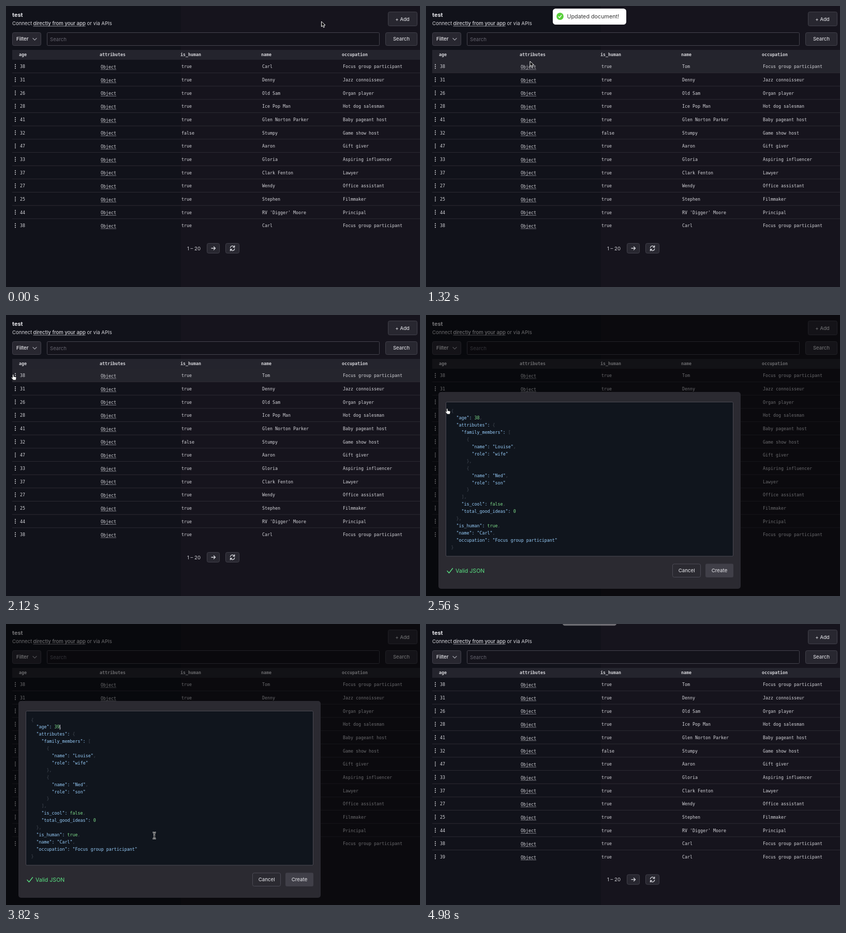
An HTML page for the animation above (5000 ms loop, 800x544 px).

```html
<!DOCTYPE html>
<html lang="en">
<head>
<meta charset="utf-8">
<title>Document table</title>
<style>
  html, body { margin: 0; width: 100%; height: 100%; overflow: hidden; background: #12121a; }
  svg { display: block; width: 800px; height: 544px; }
  text { font: 9.6px Inter, sans-serif; fill: #d3d3d8; }
  .mono { font: 8.32px "DejaVu Sans Mono", monospace; }
  .head { font-weight: 700; }
  .title { font-size: 10.97px; font-weight: 700; fill: #e6e6ea; }
  .mid { font-weight: 500; }
  .bold { font-weight: 600; }
  .json { fill: #97cdfa; }
  .btn { fill: #282730; stroke: #41404a; }
  .line { fill: none; stroke: #d8d8de; stroke-width: 1.3; stroke-linecap: round; stroke-linejoin: round; }
</style>
</head>
<body>
<svg id="stage" viewBox="0 0 800 544" xmlns="http://www.w3.org/2000/svg"></svg>
<script>
const LOOP = 5000, ROW_TOP = 103.8, PITCH = 25.67;
const COLS = [25, 181, 337, 493, 649];
const people = [
  [38, 'Carl', 'Focus group participant'], [31, 'Denny', 'Jazz connoisseur'],
  [26, 'Old Sam', 'Organ player'], [28, 'Ice Pop Man', 'Hot dog salesman'],
  [41, 'Glen Norton Parker', 'Baby pageant host'], [32, 'Stumpy', 'Game show host'],
  [47, 'Aaron', 'Gift giver'], [33, 'Gloria', 'Aspiring influencer'],
  [37, 'Clark Fenton', 'Lawyer'], [27, 'Wendy', 'Office assistant'],
  [25, 'Stephen', 'Filmmaker'], [44, "RV 'Digger' Moore", 'Principal'],
  [38, 'Carl', 'Focus group participant'], [39, 'Carl', 'Focus group participant']
];
const doc = {
  age: 38,
  attributes: {
    family_members: [{ name: 'Louise', role: 'wife' }, { name: 'Ned', role: 'son' }],
    is_cool: false,
    total_good_ideas: 0
  },
  is_human: true,
  name: 'Carl',
  occupation: 'Focus group participant'
};

const text = (x, y, s, cls = '', more = '') => `<text x="${x}" y="${y}" class="${cls}" ${more}>${s}</text>`;
const box = (x, y, w, h, r, more) => `<rect x="${x}" y="${y}" width="${w}" height="${h}" rx="${r}" ${more}/>`;
const button = (x, y, w, h) => box(x, y, w, h, 3, 'class="btn"');
const paint = line => line.replace(/"[^"]*"|\b(\d+|true|false)\b|[{}[\],]/g, (m, value) =>
  m[0] === '"' ? m : `<tspan fill="${value ? '#80e08c' : '#414852'}">${m}</tspan>`);

function row([age, name, job], i) {
  const y = 120.2 + i * PITCH, top = ROW_TOP + i * PITCH;
  const dots = [-6.7, -3.2, 0.3].map(d => `<circle cx="18" cy="${y + d}" r="1" fill="#dedee3"/>`).join('');
  const cells = [age, '', i === 5 ? 'false' : 'true', name, job]
    .map((s, c) => text(COLS[c] + 2, y, s, 'mono', c === 3 ? `id="name${i}"` : '')).join('');
  const rule = i ? `<path d="M12 ${top}H800" stroke="#2c2b33"/>` : '';
  return `<g id="row${i}">${box(12, top, 788, PITCH, 0, `id="hover${i}" fill="#25252d"`)}${rule}${dots}${cells}
    ${text(183, y + 0.8, 'Object', 'mono')}
    <path d="M183 ${y + 2.8}h30" stroke="#9a9aa2" stroke-width=".8"/></g>`;
}

const page = `
  <rect width="800" height="544" fill="#16141d"/><rect width="338" height="544" fill="#11121a"/>
  ${text(12, 20.5, 'test', 'title')}
  ${text(12, 37, 'Connect')}${text(52.5, 37, 'directly from your app', 'mid')}${text(156.5, 37, 'or via APIs')}
  <path d="M52.5 39h101" stroke="#b5b5bc" stroke-width=".8"/>
  ${button(738.5, 11.5, 56, 27)}${text(766, 28.5, '+ Add', 'mid', 'text-anchor="middle"')}
  ${button(12.5, 51.5, 55, 25)}${text(20, 67.4, 'Filter', 'bold')}
  <path class="line" d="M52 62.5l3.5 3.5 3.5-3.5" style="stroke:#9a9aa3"/>
  ${box(79.5, 51.5, 642, 25, 2, 'fill="#14131b" stroke="#45444e"')}
  ${text(85, 67.8, 'Search', '', 'style="fill:#65646f"')}
  ${button(733.5, 51.5, 61, 25)}${text(764, 67.4, 'Search', 'mid', 'text-anchor="middle"')}
  ${box(12, 85, 788, 19, 0, 'fill="#24242d"')}
  ${['age', 'attributes', 'is_human', 'name', 'occupation'].map((s, i) => text(COLS[i], 97.2, s, 'mono head')).join('')}
  ${people.map(row).join('')}
  <g id="pager">
    ${text(350, 472.5, '1 – 20')}
    ${button(388.5, 459.5, 24, 19)}<path class="line" d="M397 469h7.5m-3-3l3 3-3 3"/>
    ${button(424.5, 459.5, 26, 19)}
    <path class="line" d="M433.5 468a4 4 0 0 1 7-2.3l1.2 1.3m0-3v3h-3M441.7 470a4 4 0 0 1-7 2.3l-1.2-1.3m0 3v-3h3"/>
  </g>`;

const code = JSON.stringify(doc, null, 2).split('\n').map((line, i) => {
  const body = line.trimStart(), x = 48.5 + (line.length - body.length) * 5.01;
  return text(x, 188.6 + i * 13.89, paint(body), 'mono json', `id="code${i}"`);
}).join('');

const modal = `<g id="modal">
  <rect width="800" height="544" opacity=".5"/>
  ${box(24, 149, 584, 381, 5, 'fill="#2b2a31"')}
  ${box(38.5, 168.5, 555, 298.5, 2, 'fill="#10151d" stroke="#4b4a53"')}
  ${code}
  <path id="caret" d="M104.3 195v9.5" stroke="#e8e8ee"/>
  <path class="line" d="M41 495.5l3.5 4 7-9" style="stroke:#5be584"/>
  ${text(57, 498.8, 'Valid JSON', '', 'style="font-size:10.6px;fill:#5be584"')}
  ${box(476.5, 482, 54, 25.5, 3, 'fill="#2b2a31" stroke="#4c4b55"')}
  ${text(503.7, 498.4, 'Cancel', 'mid', 'text-anchor="middle"')}
  ${box(540, 481.5, 54, 26.5, 3, 'fill="#403f48"')}
  ${text(567, 498.4, 'Create', 'mid', 'text-anchor="middle"')}
</g>`;

const toast = (id, x, w, label) => `<g id="${id}">
  ${box(x, 5, w, 31, 5.5, 'fill="#fff"')}
  <g id="${id}Icon"><circle r="6.9" fill="#58cf3a"/>
  <path class="line" d="M-2.8 .4l2 2.1 3.4-4.6" style="stroke:#fff;stroke-width:1.4"/></g>
  ${text(x + 27.5, 24.2, label, '', 'style="font-size:10.75px;fill:#363636"')}</g>`;

const pointers = `<g id="pointer" stroke-linejoin="round">
  <path id="arrow" d="M0 0v10l2.4-2.2 1.6 3.8 1.9-.8-1.6-3.7h3.2z" fill="#000" stroke="#fff" stroke-width="1"/>
  <path id="hand" d="M-1.3 1.2c0-1.6 2.2-1.6 2.2 0v3l4 .8c1 .3 1.2 1 1 2l-.8 4h-5l-3.4-4c-.8-1.2.5-2 1.3-1.2l.7.7z" fill="#fff" stroke="#111" stroke-width=".7"/>
  <g id="beam" fill="none"><path d="M-3-6Q0-6 0-4Q0-6 3-6M0-4.5v9M-3 6Q0 6 0 4Q0 6 3 6M-1.5 1.5h3" stroke="#fff" stroke-width="2.6"/>
  <path d="M-3-6Q0-6 0-4Q0-6 3-6M0-4.5v9M-3 6Q0 6 0 4Q0 6 3 6M-1.5 1.5h3" stroke="#000" stroke-width="1"/></g>
</g>`;

const $ = id => document.getElementById(id);
$('stage').innerHTML = page + modal + toast('updated', 245, 142, 'Updated document!')
  + toast('created', 247, 138, 'Created document!') + pointers;

const show = (id, on) => $(id).setAttribute('visibility', on ? 'visible' : 'hidden');
const clamp = v => Math.max(0, Math.min(1, v));
const mix = (a, b, p) => a + (b - a) * p;

// time, x, y, pointer shape
const path = [
  [40, 609.5, 30, 'arrow'], [320, 505, 115, 'arrow'], [1060, 505, 115, 'arrow'],
  [1320, 201, 107, 'arrow'], [1540, 205, 281, 'arrow'], [1660, 205, 281, 'arrow'],
  [1780, 190, 404, 'arrow'], [2100, 14, 115, 'hand'], [2440, 14, 115, 'hand'],
  [2740, 90, 300, 'beam'], [3040, 128.5, 248, 'beam'], [3180, 106, 201, 'beam'],
  [3560, 106, 201, 'beam'], [3820, 286.5, 409.5, 'beam'], [4000, 560, 494, 'hand'],
  [4090, 560, 494, 'hand'], [4360, 455, 435, 'beam'], [4780, 470, 505, 'beam']
];

function pointerAt(t) {
  const i = path.findIndex(k => k[0] >= t);
  const b = path[i < 0 ? path.length - 1 : i], a = path[i - 1] || b;
  const p = b === a ? 1 : clamp((t - a[0]) / (b[0] - a[0])), e = p * p * (3 - 2 * p);
  return { x: mix(a[1], b[1], e), y: mix(a[2], b[2], e), shape: p < 0.5 ? a[3] : b[3] };
}

function drawToast(id, t, start, iconX) {
  const enter = clamp((t - start) / 45), leave = clamp((t - start - 850) / 50);
  const rise = 1 - (1 - enter) ** 3;
  const scale = mix(0.6, 1, rise) - 0.4 * leave;
  const y = 20.5 - 62 * (1 - rise) - 46.5 * leave;
  const el = $(id);
  el.setAttribute('display', enter > 0 && leave < 1 ? 'inline' : 'none');
  el.setAttribute('opacity', mix(0.5, 1, rise) * (1 - leave));
  el.setAttribute('transform', `translate(316 ${y}) scale(${scale}) translate(-316 -20.5)`);
  $(id + 'Icon').setAttribute('transform', `translate(${iconX} 20) scale(${clamp((t - start - 15) / 50)})`);
}

function editedName(t) {
  if (t < 560) return 'Carl';
  return 'Tom'.slice(0, clamp((t - 590) / 150) * 3);
}

function draw(t) {
  const open = t >= 2460 && t < 4090, added = t >= 4090;
  const p = pointerAt(t), here = t < 4780;
  const hover = here && !open ? Math.floor((p.y - ROW_TOP) / PITCH) : -1;
  people.forEach((_, i) => show('hover' + i, i === hover && (i < 13 || added)));
  $('row13').setAttribute('display', added ? 'inline' : 'none');
  $('pager').setAttribute('transform', `translate(0 ${added ? PITCH : 0})`);
  $('name0').textContent = editedName(t);

  $('modal').setAttribute('display', open ? 'inline' : 'none');
  $('modal').setAttribute('opacity', clamp((t - 2450) / 50));
  const age = t < 3260 ? '38' : t < 3420 ? '3' : '39';
  $('code1').innerHTML = paint(`"age": ${age},`);
  $('caret').setAttribute('opacity', t >= 3190 ? 1 : 0);
  $('caret').setAttribute('transform', `translate(${(age.length - 2) * 5.01} 0)`);

  drawToast('updated', t, 810, 259);
  drawToast('created', t, 4100, 261);

  $('pointer').setAttribute('transform', `translate(${p.x} ${p.y})`);
  for (const shape of ['arrow', 'hand', 'beam']) show(shape, here && shape === p.shape);
}

const began = performance.now();
function tick() {
  draw((performance.now() - began) % LOOP);
  requestAnimationFrame(tick);
}
tick();
</script>
</body>
</html>
```
